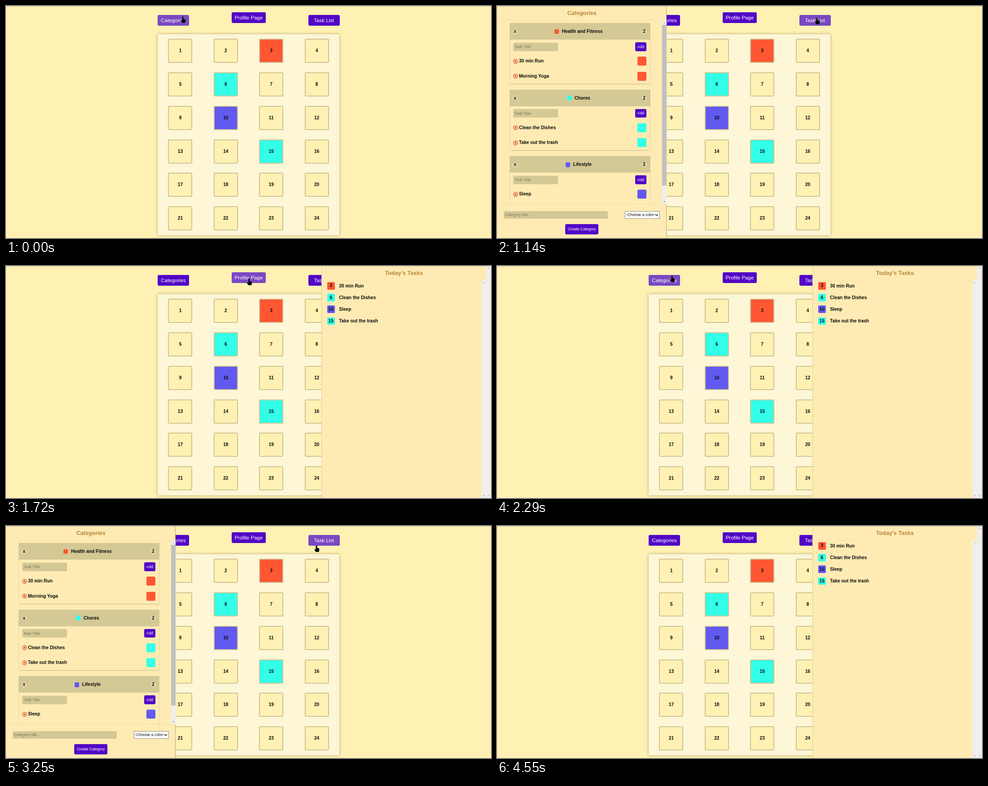
An HTML page that plays this animation: 1081x518 px, repeating every 5820 ms.

```html
<!DOCTYPE html>
<html lang="en">
<head>
<meta charset="utf-8">
<title>Task calendar</title>
<style>
  html, body { margin: 0; width: 100%; height: 100%; overflow: hidden; }
  body { position: relative; background: #fef1b3; color: #0b0b0b; font: bold 10.2px/12px "Liberation Sans", Arial, sans-serif; }
  div, span, svg { position: absolute; box-sizing: border-box; white-space: nowrap; }
  .mid { display: flex; align-items: center; justify-content: center; }
  .btn { background: #5206c6; color: #fff; border-radius: 3px; font-weight: 400; font-size: 8.5px; }
  .nav { font-size: 11.5px; }
  .hover { background: #7a48c3; }
  .board { left: 337.8px; top: 63px; width: 405.4px; height: 448.5px; background: #fdf6d7; box-shadow: 0 0 6px rgba(70, 60, 10, .42); }
  .cell { width: 54px; height: 54px; border: 2px solid #cfc48f; border-radius: 3px; background: #fef1b3; }
  .panel { top: 0; width: 378.35px; height: 518px; background: #feebb3; }
  .left { left: 0; border-right: 1px solid #b7a678; }
  .right { left: 702.65px; border-left: 1px solid #dfcd9c; }
  .inner { left: 0; top: 0; right: -1px; bottom: 0; }
  .right .inner { right: 0; }
  .scroll .inner { right: 9.5px; }
  .right.scroll .inner { right: 10.5px; }
  .panel > .bar { display: none; }
  .scroll > .bar { display: block; }
  .head { left: 0; right: 0; top: 0; height: 32.5px; border-bottom: 1px solid #f4dfa7; color: #b9863a; font-size: 12.6px; }
  .list { left: 0; right: 0; top: 32px; height: 411px; overflow: hidden; }
  .left .list { border-bottom: 1px solid #f0dba4; }
  .bar { top: 0; bottom: 0; right: 0; width: 10.5px; background: #f0efed; }
  .bar::before, .bar::after { content: ""; position: absolute; left: 3px; border: solid transparent; border-width: 0 2.3px; }
  .bar::before { top: 4px; border-bottom: 2.8px solid #9b9b9b; }
  .bar::after { bottom: 4px; border-top: 2.8px solid #9b9b9b; }
  .thumb::after { border-top-color: #505050; }
  .thumb i { position: absolute; left: .5px; right: .5px; top: 10px; height: 359px; background: #c0c0c0; }
  .block { left: 27.5px; right: 36.8px; height: 136.5px; border: 1px solid #e6d5a0; border-bottom-color: #c4b583; border-radius: 2px; }
  .top { left: -1px; right: -1px; top: -1px; height: 37px; background: #d4c895; border-radius: 2px 2px 0 0; }
  .badge { width: 11px; height: 11px; top: 13.5px; border-radius: 50%; background: #e6dbb0; }
  .name { left: 0; right: 5.6px; top: 0; height: 38px; }
  .name i { width: 10.5px; height: 10.5px; border-radius: 2px; margin-right: 6.5px; }
  .field { background: #d4c895; border-radius: 3px; color: #80775b; font-weight: 400; font-size: 8.7px; padding-left: 3px; display: flex; align-items: center; }
  .select { right: 15.6px; top: 458px; width: 78px; height: 16.5px; background: #fff; border: 1px solid #8a8a80; font-weight: 400; font-size: 8.8px; line-height: 15px; padding-left: 2px; }
  #line { left: 0; right: 0; top: 0; height: 1px; background: #cbc090; }
</style>
</head>
<body>
<script>
const RED = "#ff5733", CYAN = "#33ffe9", BLUE = "#6259f0";
const W = 378.35, FAR = 1020, LOOP = 5820;

const box = (cls, css, html = "") => `<div class="${cls}" style="${css}">${html}</div>`;
const rect = (x, y, w, h) => `left:${x}px;top:${y}px;width:${w}px;height:${h}px;`;
const text = (x, y, s) => `<span style="left:${x}px;top:${y - 6}px">${s}</span>`;

// Main page
const buttons = [["Categories", 338, 20, 70], ["Profile Page", 503, 14, 76], ["Task List", 673.7, 20, 70]];
const marked = { 3: RED, 6: CYAN, 10: BLUE, 15: CYAN };
let cells = "";
for (let i = 0; i < 24; i++) {
  const x = 50.7 + 101.35 * (i % 4) - 27, y = 37.4 + 74.75 * Math.floor(i / 4) - 27;
  cells += box("cell mid", `left:${x}px;top:${y}px;background:${marked[i + 1] || ""}`, i + 1);
}

// Category panel
const removeIcon = y => `<svg style="left:7.5px;top:${y - 5.5}px" width="11" height="11" fill="none" stroke="#e0301e" stroke-width="1.1">
  <circle cx="5.5" cy="5.5" r="4.6"/><path d="M3.5 3.5l4 4m0-4l-4 4"/></svg>`;
const task = (name, color, i) => {
  const y = 84 + 33.8 * i;
  return removeIcon(y) + text(20.5, y, name) +
    box("", `right:7.5px;top:${y - 10}px;width:20px;height:20px;border-radius:3px;background:${color}`);
};
const category = ([name, color, tasks], i) => box("block", `top:${6 + 148.7 * i}px`,
  box("top", "",
    box("badge mid", "left:7.3px", "x") +
    box("name mid", "", `<i style="background:${color}"></i>${name}`) +
    box("badge mid", "right:8px", "2")) +
  box("field", rect(7.5, 42.5, 100, 19), "Task Title") +
  box("btn mid", "right:7.5px;top:42px;width:25.5px;height:19.5px", "Add") +
  tasks.map((t, k) => task(t, color, k)).join(""));
const categories = [
  ["Health and Fitness", RED, ["30 min Run", "Morning Yoga"]],
  ["Chores", CYAN, ["Clean the Dishes", "Take out the trash"]],
  ["Lifestyle", BLUE, ["Sleep"]]
];
const chevron = `<svg style="right:2px;top:5px" width="8" height="6" fill="none" stroke="#111" stroke-width="1.4"><path d="M1 1l3 3 3-3"/></svg>`;
const leftPanel = box("inner", "",
  box("head mid", "", "Categories") +
  box("list", "", categories.map(category).join("") + box("bar thumb", "", "<i></i>")) +
  box("field", "left:15px;top:458px;height:16.5px;width:calc((100% - 30px) * 2 / 3)", "Category title...") +
  box("select", "", "-Choose a color-" + chevron) +
  box("btn mid", "left:calc(50% - 37.3px);top:487px;width:74.6px;height:22.5px", "Create Category")
) + box("bar", "");

// Today panel
const today = [[3, "30 min Run"], [6, "Clean the Dishes"], [10, "Sleep"], [15, "Take out the trash"]];
const rightPanel = box("inner", "",
  box("head mid", "", "Today's Tasks") +
  box("list", "height:486px",
    today.map(([n, name], i) => {
      const y = 12.5 + 26.1 * i;
      return box("mid", rect(12.3, y - 8.3, 16.6, 16.6) + `border-radius:2px;background:${marked[n]}`, n) + text(38.7, y, name);
    }).join("") + box("bar", ""))
) + box("bar", "");

document.body.innerHTML =
  buttons.map(([s, x, y, w]) => box("btn nav mid", rect(x, y, w, 24.3), s)).join("") +
  box("board", "", cells) +
  box("panel left", "", leftPanel) +
  box("panel right scroll", "", rightPanel) +
  `<div id="line"></div>
  <svg id="cursor" width="20" height="24" style="left:0;top:0;overflow:visible"><path stroke="#fff" stroke-width=".4" stroke-opacity=".5"/></svg>`;

const $ = s => document.querySelector(s);
const left = $(".left"), right = $(".right"), cursor = $("#cursor"), shape = $("#cursor path");
const navs = [...document.querySelectorAll(".nav")];
const HAND = "M-1.6 1Q0-1 1.6 1V5.5L5.4 6.8Q7 7.5 6.5 10L5.4 15H-1.4L-4.6 10.2Q-5 8-3 8.3L-1.6 9.6Z";
const ARROW = "M0 0V11L2.5 8.8 4.2 12.7 5.9 12 4.2 8.2H7.5Z";

// The picture is refreshed in bursts: start, end, count
const steps = [0];
for (const [a, b, n] of [[200, 770, 7], [860, 1140, 4], [1250, 1430, 3], [1540, 1800, 4], [2000, 2290, 4],
  [2590, 3160, 7], [3250, 3250, 1], [3750, 3860, 2], [4050, 4550, 6]])
  for (let i = 0; i < n; i++) steps.push(n > 1 ? Math.floor((a + (b - a) * i / (n - 1)) / 10) * 10 : a);

// Panel switches: first visible time, time already elapsed by then
const switches = [[200, 150], [1250, 150], [2590, 180], [4050, 143]];

// Cursor tip: time, x, y
const path = [[0, 394, 23], [200, 400, 23], [770, 758, 30], [860, 752, 31], [1140, 713, 26], [1540, 713, 26],
  [1800, 451, 29], [2000, 444, 28], [2290, 390, 21], [2590, 390, 21], [2780, 590, 10], [3160, 692, 45],
  [3250, 692, 43], [3740, 692, 43], [3860, 691, 37], [4050, 691, 37], [4250, 690, 4], [4350, 690, -30]];

// CSS "ease": cubic-bezier(.25, .1, .25, 1)
function ease(x) {
  if (x >= 1) return 1;
  const bez = (a, b, u) => 3 * a * u * (1 - u) ** 2 + 3 * b * u * u * (1 - u) + u ** 3;
  let lo = 0, hi = 1;
  for (let i = 0; i < 24; i++) {
    const m = (lo + hi) / 2;
    if (bez(.25, .25, m) < x) lo = m; else hi = m;
  }
  return bez(.1, 1, lo);
}

function tipAt(t) {
  const k = path.findIndex(p => p[0] > t);
  if (k < 0) return path[path.length - 1].slice(1);
  const [t0, x0, y0] = path[k - 1], [t1, x1, y1] = path[k];
  const f = (t - t0) / (t1 - t0);
  return [x0 + (x1 - x0) * f, y0 + (y1 - y0) * f];
}

function draw(now) {
  const time = now % LOOP;
  const t = steps.filter(s => s <= time).pop();
  const turn = switches.filter(s => s[0] <= t).length;
  let hideLeft = 1, hideRight = 1;
  if (turn) {
    const [at, lead] = switches[turn - 1];
    const p = ease((t - at + lead) / 500);
    hideLeft = turn % 2 ? 1 - p : p;
    if (turn > 1) hideRight = 1 - hideLeft;
  }
  left.style.transform = `translateX(${-W * hideLeft}px)`;
  left.style.visibility = hideLeft === 1 ? "hidden" : "visible";
  left.classList.toggle("scroll", turn > 0 && turn % 2 === 0);
  right.style.transform = `translateX(${FAR * hideRight}px)`;

  const [x, y] = tipAt(t);
  const free = x > W * (1 - hideLeft) && x < 1081 - W + FAR * hideRight;
  let over = false;
  buttons.forEach(([, bx, by, bw], i) => {
    const hit = free && x > bx && x < bx + bw && y > by && y < by + 24.3;
    navs[i].classList.toggle("hover", hit);
    over = over || hit;
  });
  shape.setAttribute("d", over ? HAND : ARROW);
  cursor.style.transform = `translate(${x}px, ${y}px)`;
}

const start = performance.now();
function tick() {
  draw(performance.now() - start);
  requestAnimationFrame(tick);
}
tick();
</script>
</body>
</html>
```
